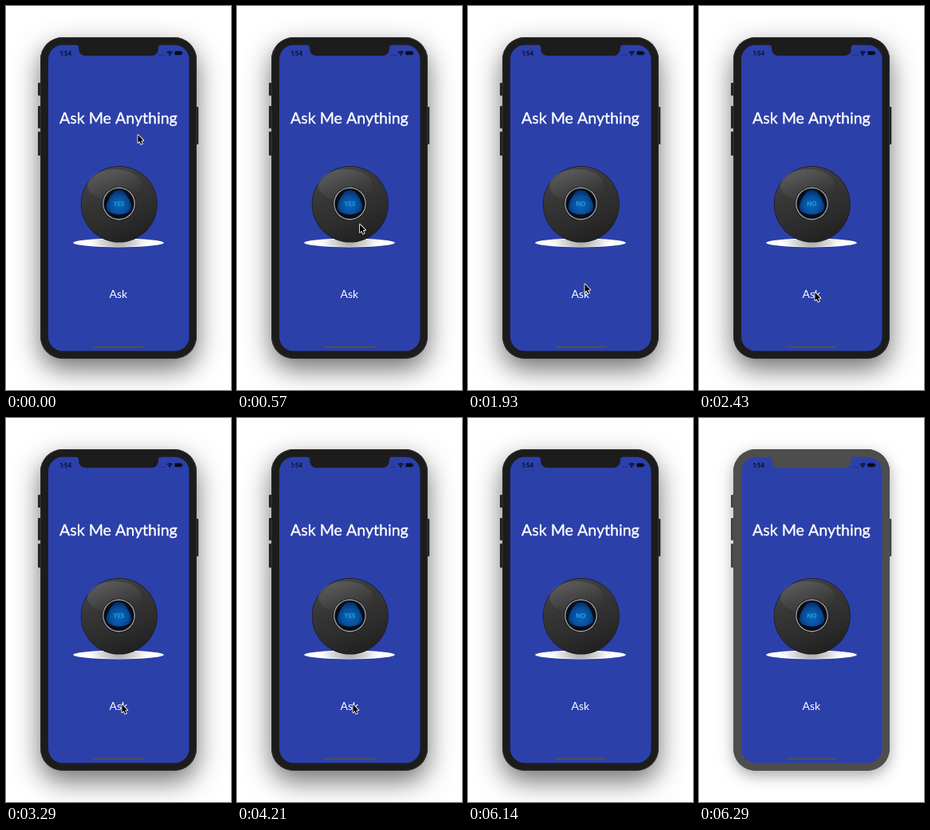
Write an HTML page with a canvas that moves like this. It is 282 px wide and 480 px high and loops after 7.29 s.

```html
<!DOCTYPE html>
<html lang="en">
<head>
<meta charset="utf-8">
<title>Ask Me Anything</title>
<style>
  html, body { margin: 0; width: 100%; height: 100%; overflow: hidden; background: #fff; }
  canvas { display: block; width: 282px; height: 480px; }
</style>
</head>
<body>
<canvas id="stage"></canvas>
<script>
const W = 282, H = 480, LOOP = 7290, FPS = 14;
const canvas = document.getElementById('stage');
const ctx = canvas.getContext('2d');
const dpr = window.devicePixelRatio || 1;
canvas.width = W * dpr;
canvas.height = H * dpr;

// All times below are counted in ticks of 1/14 s.
const BLUR_AT = 88;
const presses = [[14, 15], [40, 41], [52, 54], [64, 66], [77, 79]];
const answers = [[0, 'YES'], [15, 'NO'], [41, 'YES'], [66, 'NO']];
const moves = [
  { from: 2, to: 13, a: [165.4, 161], b: [145.4, 358] },
  { from: 26, to: 30, a: [145.4, 358], b: [152, 291] },
  { from: 30, to: 34, a: [152, 291], b: [145.4, 358] },
  { from: 79, to: 86, a: [145.4, 358], b: [152, 484] }
];

const clamp = u => Math.max(0, Math.min(1, u));
const smooth = u => u * u * (3 - 2 * u);

function roundRect(x, y, w, h, r, fill) {
  ctx.beginPath();
  ctx.roundRect(x, y, w, h, r);
  ctx.fillStyle = fill;
  ctx.fill();
}

function ellipse(x, y, rx, ry, fill) {
  ctx.beginPath();
  ctx.ellipse(x, y, rx, ry, 0, 0, Math.PI * 2);
  ctx.fillStyle = fill;
  ctx.fill();
}

function gradient(g, stops) {
  stops.forEach(([at, color]) => g.addColorStop(at, color));
  return g;
}

function label(text, x, y, font, color, weight = 0) {
  ctx.font = font;
  ctx.fillStyle = color;
  ctx.textAlign = 'center';
  ctx.fillText(text, x, y);
  if (weight) {
    ctx.strokeStyle = color;
    ctx.lineWidth = weight;
    ctx.strokeText(text, x, y);
  }
}

function drawBody(active) {
  const edge = active ? '#303032' : '#505050';
  const side = active ? '#242426' : '#444';
  const shell = active ? '#1c1c1d' : '#4d4d4d';

  ctx.save();
  ctx.shadowColor = active ? 'rgba(0,0,0,.56)' : 'rgba(0,0,0,.34)';
  ctx.shadowBlur = (active ? 33 : 18) * dpr;
  ctx.shadowOffsetY = (active ? 13 : 6) * dpr;
  roundRect(43, 39, 196, 402, 28, edge);
  ctx.restore();

  [[96, 16], [125, 28], [157, 30]].forEach(([y, h]) => roundRect(40, y, 4, h, 1, side));
  roundRect(238, 126, 3.2, 47, 1, side);
  roundRect(43, 39, 196, 402, 28, edge);
  roundRect(44, 40, 194, 400, 27, shell);
  roundRect(53, 48.7, 176.5, 382.6, 18, '#2c40aa');

  // Notch with flared shoulders
  ctx.beginPath();
  ctx.moveTo(88, 48);
  ctx.lineTo(88, 48.7);
  ctx.quadraticCurveTo(91, 48.7, 91, 52);
  ctx.quadraticCurveTo(91, 62.3, 101, 62.3);
  ctx.lineTo(181, 62.3);
  ctx.quadraticCurveTo(191, 62.3, 191, 52);
  ctx.quadraticCurveTo(191, 48.7, 194, 48.7);
  ctx.lineTo(194, 48);
  ctx.fillStyle = shell;
  ctx.fill();
  roundRect(109.4, 425, 63.6, 2.3, 1.2, '#4b4f60');
}

function drawStatus() {
  const ink = '#070a1c';
  label('1:54', 75, 62, '600 7.2px Inter, sans-serif', ink);
  for (let i = 0; i < 4; i++) ellipse(193 + i * 2, 61.2, 0.55, 0.55, '#141d50');
  ctx.strokeStyle = ink;
  ctx.lineWidth = 1.3;
  [4.6, 2.6].forEach(r => {
    ctx.beginPath();
    ctx.arc(205.2, 61.4, r, -Math.PI * 0.76, -Math.PI * 0.24);
    ctx.stroke();
  });
  ellipse(205.2, 60.9, 1, 1, ink);
  roundRect(211.4, 56.5, 9, 4.8, 1.3, ink);
  roundRect(220.8, 58, 0.8, 1.8, 0.4, ink);
}

function drawBall(answer) {
  ellipse(141, 296, 56.8, 5.4, '#fff');
  ellipse(141, 296, 42, 5, gradient(ctx.createRadialGradient(141, 294, 4, 141, 294, 42),
    [[0, '#b4b4b4'], [0.5, '#dcdcdc'], [1, 'rgba(255,255,255,0)']]));

  ellipse(141.8, 247.8, 48, 47.8, '#1b1b1c');
  ellipse(141.8, 247.8, 47.2, 47, gradient(ctx.createLinearGradient(122, 203, 158, 294),
    [[0, '#454546'], [0.35, '#363637'], [0.7, '#2c2c2d'], [1, '#202021']]));
  ellipse(136, 224, 34, 20, gradient(ctx.createLinearGradient(126, 204, 140, 244),
    [[0, 'rgba(255,255,255,.12)'], [1, 'rgba(255,255,255,0)']]));

  ellipse(141.5, 247, 21.2, 21.2, '#161617');
  ellipse(141.5, 247, 20.4, 20.4, '#a3a7aa');
  ellipse(141.5, 247, 19.1, 19.1, '#0a0d18');

  // Blue die with rounded corners
  ctx.beginPath();
  ctx.moveTo(135.5, 231.8);
  ctx.quadraticCurveTo(141.5, 228.4, 147.5, 231.8);
  ctx.quadraticCurveTo(155, 240, 157.2, 250);
  ctx.quadraticCurveTo(157.6, 255.5, 153, 258);
  ctx.quadraticCurveTo(141.5, 263.5, 130, 258);
  ctx.quadraticCurveTo(125.4, 255.5, 125.8, 250);
  ctx.quadraticCurveTo(128, 240, 135.5, 231.8);
  ctx.fillStyle = gradient(ctx.createRadialGradient(141.5, 250, 2, 141.5, 248, 18),
    [[0, '#0a61b4'], [0.55, '#07509d'], [1, '#062a62']]);
  ctx.fill();
  label(answer, 141.4, 249.7, '900 7.6px Lato, sans-serif', '#189fdc');
}

function askAlpha(k) {
  const press = presses.filter(p => k >= p[0]).pop();
  if (!press) return 1;
  if (k < press[1]) return 0.2;
  return 0.2 + 0.8 * clamp((k - press[1] + 1) / 6);
}

function drawCursor(k) {
  const m = moves.filter(v => k >= v.from).pop() || moves[0];
  const u = smooth(clamp((k - m.from) / (m.to - m.from)));
  ctx.save();
  ctx.translate(m.a[0] + (m.b[0] - m.a[0]) * u, m.a[1] + (m.b[1] - m.a[1]) * u);
  ctx.beginPath();
  [[0, 0], [0, 10], [2.2, 8], [3.7, 11.8], [5.4, 11.1], [3.9, 7.4], [6.9, 7.2]]
    .forEach(p => ctx.lineTo(...p));
  ctx.closePath();
  ctx.lineJoin = 'round';
  ctx.lineWidth = 1.7;
  ctx.strokeStyle = '#fff';
  ctx.stroke();
  ctx.fillStyle = '#000';
  ctx.fill();
  ctx.restore();
}

function draw(t) {
  const k = Math.floor((t + 5) * FPS / 1000);
  ctx.setTransform(dpr, 0, 0, dpr, 0, 0);
  ctx.fillStyle = '#fff';
  ctx.fillRect(0, 0, W, H);
  drawBody(k < BLUR_AT);
  drawStatus();
  label('Ask Me Anything', 140.9, 147, '19.6px Lato, sans-serif', '#fff', 0.35);
  drawBall(answers.filter(a => k >= a[0]).pop()[1]);
  ctx.globalAlpha = askAlpha(k);
  label('Ask', 140.8, 364.6, '14px Lato, sans-serif', '#fff');
  ctx.globalAlpha = 1;
  if (k < 86) drawCursor(k);
}

const start = performance.now();
function tick() {
  draw((performance.now() - start) % LOOP);
  requestAnimationFrame(tick);
}
tick();
</script>
</body>
</html>
```
